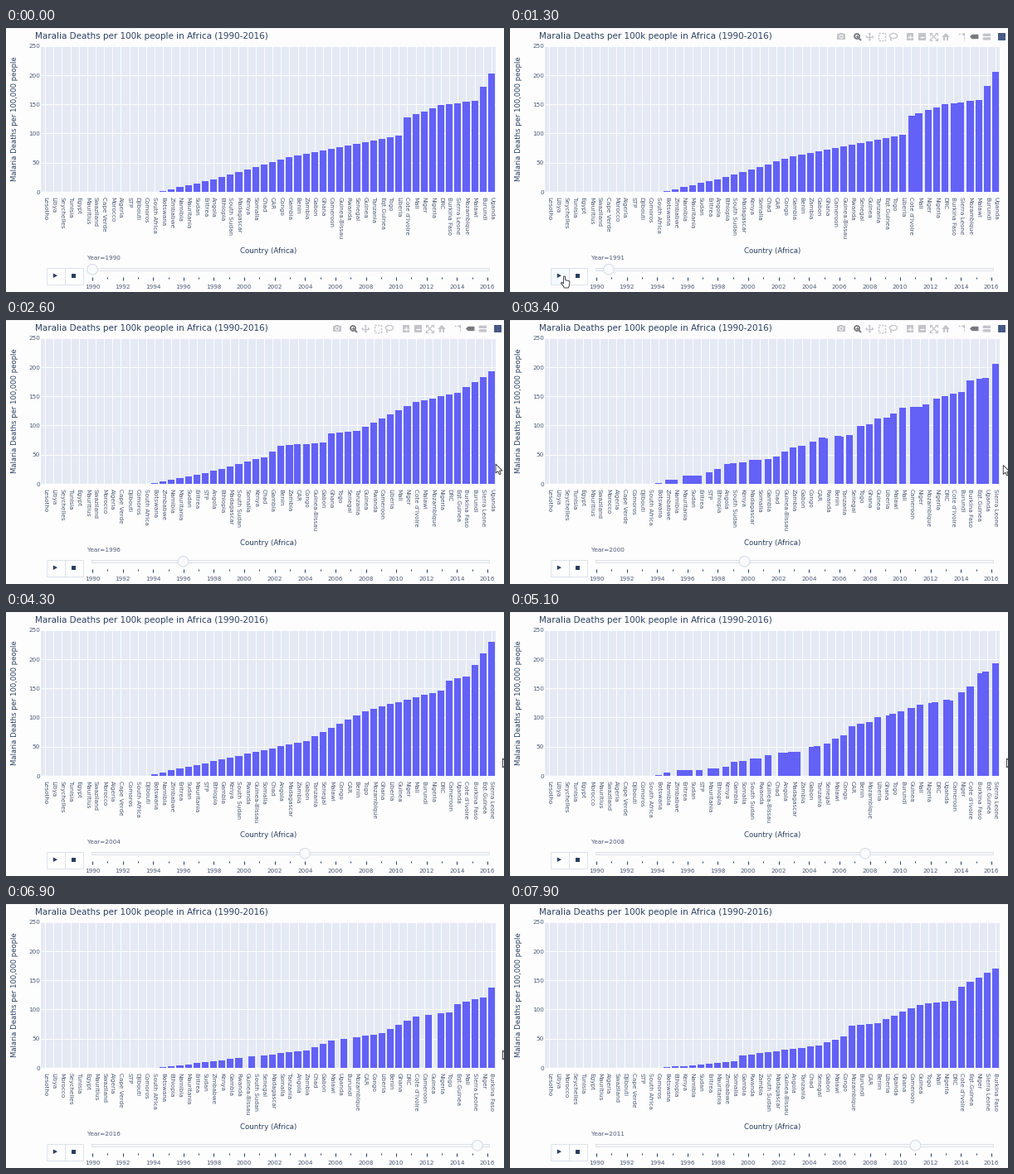
Animation, 600 px wide and 319 px high, one loop 8000 ms. Source, as a matplotlib script:

```python
import numpy as np
import matplotlib.pyplot as plt
from matplotlib.animation import FuncAnimation
from matplotlib.patches import Circle, Polygon, Rectangle

W, H, DPI = 600, 319, 100
STEP, FRAMES = 100, 80
PX = 72 / DPI
LEFT, RIGHT, TOP, BASE = 42, 590, 21.5, 198
INK, SOFT, EDGE, PALE = "#2a3f5f", "#4c5a74", "#d5dbe5", "#f8fafc"
BAR, PLOT, PAGE = "#6361f6", "#e4e9f4", "#fdfdfe"
GREY, DARK = "#c3c4c8", "#77797e"

ORDER_1990 = """Lesotho,Libya,Seychelles,Tunisia,Egypt,Mauritius,Swaziland,
Cape Verde,Morocco,Algeria,STP,Djibouti,Comoros,South Africa,Botswana,Zimbabwe,
Namibia,Mauritania,Sudan,Eritrea,Angola,Ethiopia,South Sudan,Madagascar,Kenya,
Somalia,Chad,CAR,Congo,Gambia,Benin,Zambia,Gabon,Ghana,Cameroon,Guinea-Bissau,
Rwanda,Senegal,Guinea,Tanzania,Eqt.Guinea,Togo,Liberia,Cote d'Ivoire,Mali,Niger,
Nigeria,DRC,Burkina Faso,Sierra Leone,Mozambique,Malawi,Burundi,Uganda"""
ORDER_1996 = """Lesotho,Libya,Seychelles,Tunisia,Egypt,Mauritius,Swaziland,
Morocco,Algeria,Cape Verde,Djibouti,Comoros,South Africa,Botswana,Zimbabwe,
Namibia,Mauritania,Sudan,Eritrea,STP,Angola,Ethiopia,Madagascar,South Sudan,
Somalia,Kenya,Chad,Gambia,Benin,Zambia,CAR,Congo,Guinea-Bissau,Gabon,Ghana,Togo,
Senegal,Tanzania,Guinea,Rwanda,Cameroon,Liberia,Mali,Niger,Cote d'Ivoire,Malawi,
Mozambique,Nigeria,DRC,Eqt.Guinea,Burkina Faso,Burundi,Sierra Leone,Uganda"""
ORDER_2004 = """Lesotho,Libya,Seychelles,Tunisia,Egypt,Mauritius,Swaziland,
Morocco,Algeria,Cape Verde,Comoros,South Africa,Djibouti,Botswana,Namibia,
Zimbabwe,Eritrea,Sudan,Mauritania,STP,Ethiopia,Gambia,Kenya,South Sudan,Rwanda,
Guinea-Bissau,Somalia,Chad,Angola,Madagascar,Zambia,Gabon,Tanzania,Senegal,
Malawi,Congo,CAR,Benin,Togo,Mozambique,Ghana,Liberia,Guinea,Niger,Mali,Burundi,
Nigeria,DRC,Cameroon,Uganda,Cote d'Ivoire,Burkina Faso,Eqt.Guinea,Sierra Leone"""
ORDER_2011 = """Lesotho,Libya,Morocco,Seychelles,Tunisia,Egypt,Mauritius,Algeria,
Swaziland,Djibouti,Cape Verde,STP,South Africa,Comoros,Botswana,Ethiopia,Kenya,
Namibia,Sudan,Eritrea,Mauritania,Zimbabwe,Somalia,Gambia,Rwanda,Zambia,
South Sudan,Madagascar,Guinea-Bissau,Angola,Tanzania,Chad,Senegal,Gabon,Malawi,
Congo,Mozambique,Burundi,CAR,Benin,Liberia,Uganda,Ghana,Cameroon,Guinea,Togo,
Mali,Nigeria,DRC,Cote d'Ivoire,Eqt.Guinea,Niger,Sierra Leone,Burkina Faso"""
ORDER_2015 = """Lesotho,Libya,Morocco,Seychelles,Tunisia,Egypt,Mauritius,
Swaziland,Algeria,Cape Verde,STP,Djibouti,Comoros,South Africa,Botswana,Ethiopia,
Namibia,Mauritania,Eritrea,Sudan,Zimbabwe,Kenya,Gambia,Rwanda,Guinea-Bissau,
South Sudan,Senegal,Madagascar,Somalia,Tanzania,Angola,Zambia,Chad,Gabon,Malawi,
Uganda,Burundi,Mozambique,CAR,Congo,Liberia,Benin,Ghana,DRC,Cote d'Ivoire,
Cameroon,Guinea,Nigeria,Togo,Eqt.Guinea,Mali,Sierra Leone,Niger,Burkina Faso"""

# Bends (rank, rate) of the sorted profile; straight in between.
BENDS_1990 = [(14, 1), (21, 25), (29, 60), (42, 96), (43, 128), (47, 148), (51, 156), (53, 203)]
BENDS_1996 = [(13, 1), (21, 25), (26, 46), (28, 65), (33, 71), (34, 86), (37, 90), (44, 140),
              (49, 156), (53, 192)]
BENDS_2004 = [(13, 3), (20, 25), (31, 60), (38, 111), (47, 146), (48, 163), (50, 170), (53, 229)]
BENDS_2011 = [(14, 1), (22, 11), (23, 21), (32, 38), (35, 54), (36, 72), (39, 77), (44, 108),
              (48, 115), (49, 139), (53, 170)]
BENDS_2015 = [(14, 1), (22, 15), (31, 30), (34, 46), (40, 59), (44, 88), (48, 95), (49, 109),
              (52, 121), (53, 137)]


def names(text):
    return text.replace("\n", "").split(",")


def swapped(order, *ranks):
    order = list(order)
    for r in ranks:
        order[r], order[r + 1] = order[r + 1], order[r]
    return order


COUNTRIES = names(ORDER_1990)
N = len(COUNTRIES)
SLOT = (RIGHT - LEFT) / N


def by_country(order, bends):
    """Rates in the fixed country order; near zero below the first bend."""
    rank = np.arange(N)
    rates = np.interp(rank, *zip(*bends), left=0) + rank * 1e-3
    return rates[[order.index(c) for c in COUNTRIES]]


last = names(ORDER_2015)
KEYS = {
    1990: by_country(COUNTRIES, BENDS_1990),
    1991: by_country(swapped(COUNTRIES, 43, 48), BENDS_1990) * 1.012,
    1996: by_country(names(ORDER_1996), BENDS_1996),
    2004: by_country(names(ORDER_2004), BENDS_2004),
    2011: by_country(names(ORDER_2011), BENDS_2011),
    2015: by_country(last, BENDS_2015),
    2016: by_country(swapped(last, 24, 35, 45), BENDS_2015),
}
YEARS = range(1990, 2017)
stack = np.array(list(KEYS.values()))
VALUES = {y: np.array([np.interp(y, list(KEYS), col) for col in stack.T]) for y in YEARS}
RANKS = {y: np.argsort(np.argsort(VALUES[y])) for y in YEARS}

# Playback as (time, years passed), then a drag back to 2011.
PLAY = [(1180, 0), (1300, .7), (2600, 5.9), (4300, 13.9), (5800, 20.9), (6900, 25.5), (7010, 26)]
DRAG_START, DRAG_TIME = 7450, 250
# Pointer path as (time, x, y).
PATH = [(600, 606, 183), (700, 560, 190), (1100, 65, 300), (1550, 65, 300), (2400, 590, 174),
        (3300, 590, 174), (3500, 598.5, 177), (6900, 598.5, 177), (7200, 580, 285),
        (7400, 580, 290), (7650, 488.5, 290), (7800, 488.5, 330)]


def ease(u):
    u = min(max(u, 0), 1)
    return 4 * u ** 3 if u < .5 else 1 - 4 * (1 - u) ** 3


def state(t):
    """Old year, new year and phase of the step that runs at time t."""
    if t >= DRAG_START:
        return 2016, 2011, min((t - DRAG_START) / DRAG_TIME, 1)
    p = np.interp(t, *zip(*PLAY))
    if p == 0:
        return 1990, 1990, 1
    n = min(int(p), 25)
    return 1990 + n, 1991 + n, p - n


def slide_x(year):
    return 104 + (year - 1990) * 476 / 26


plt.rcParams["font.family"] = "DejaVu Sans"
fig = plt.figure(figsize=(W / DPI, H / DPI), dpi=DPI, facecolor=PAGE)
ax = fig.add_axes([0, 0, 1, 1])
ax.set_xlim(0, W)
ax.set_ylim(H, 0)
ax.axis("off")


def rect(x, y, w, h, fill, edge="none", lw=.8, z=1):
    return ax.add_patch(Rectangle((x, y), w, h, fc=fill, ec=edge, lw=lw * PX, zorder=z))


def poly(points, fill, edge="none", lw=.8, z=1):
    return ax.add_patch(Polygon(points, closed=True, fc=fill, ec=edge, lw=lw * PX, zorder=z))


def line(xs, ys, color, lw, z=1):
    return ax.plot(xs, ys, color=color, lw=lw * PX, zorder=z, solid_capstyle="butt")[0]


def ring(x, y, r, fill, edge, lw, z=1):
    return ax.add_patch(Circle((x, y), r, fc=fill, ec=edge, lw=lw * PX, zorder=z))


def text(x, y, s, px=7.3, color=SOFT, **kw):
    return ax.text(x, y, s, fontsize=px * PX, color=color, **kw)


def draw_chart():
    rect(0, 0, W, 1.2, "#f1f1f3")
    rect(LEFT, TOP, RIGHT - LEFT, BASE - TOP, PLOT)
    for i in range(N):
        x = LEFT + (i + .5) * SLOT
        line([x, x], [TOP, BASE], "white", .9)
    for v in range(0, 251, 50):
        y = BASE - v * (BASE - TOP) / 250
        line([LEFT, RIGHT], [y, y], "white", 1.3 if v == 0 else .9)
        text(41, y + 2.7, str(v), ha="right")
    text(35, 12.9, "Maralia Deaths per 100k people in Africa (1990-2016)", 10.4, INK)
    text(11, 109.5, "Malaria Deaths per 100,000 people", 8.5, INK,
         rotation=90, ha="center", va="center")
    text(316, 271.6, "Country (Africa)", 8.6, INK, ha="center")


def draw_controls():
    button = rect(49, 289.5, 21.5, 20.5, "white", EDGE)
    rect(71, 289.5, 21.5, 20.5, "white", EDGE)
    poly([(56.8, 296.4), (56.8, 302), (62, 299.2)], INK, z=2)
    rect(79.2, 296.7, 4.8, 4.8, INK, z=2)
    rect(103, 290.2, 479, 3, PALE, EDGE)
    for year in YEARS:
        x = slide_x(year)
        even = year % 2 == 0
        line([x, x], [301, 304.5 if even else 303.3], INK, 1)
        if even:
            text(x, 315.3, str(year), ha="center")
    return button


def draw_modebar():
    y = 10.5
    parts = [rect(394, 6.8, 10, 7.4, GREY), rect(397, 5.6, 4, 2, GREY),
             ring(399, y, 2, GREY, "white", .9, 2)]
    parts += [ring(418, 10, 3, "none", DARK, 1.8), line([420, 423], [12, 15], DARK, 2),
              line([416.4, 419.6], [10, 10], DARK, 1), line([418, 418], [8.4, 11.6], DARK, 1)]
    parts += [line([429, 437.4], [y, y], GREY, 1.3), line([433.2] * 2, [6.3, 14.7], GREY, 1.3)]
    for dx, dy in ((1, 0), (-1, 0), (0, 1), (0, -1)):
        tip = np.array([433.2 + 5 * dx, y + 5 * dy])
        back, side = np.array([dx, dy]) * 2, np.array([dy, dx]) * 1.9
        parts.append(poly([tip, tip - back + side, tip - back - side], GREY))
    box = rect(443.6, 6.2, 8.6, 8.6, "none", GREY, 1.4)
    box.set_linestyle((0, (1.6, 1.1)))
    a = np.linspace(0, 2 * np.pi, 30)
    parts += [box, line(462 + 4.6 * np.cos(a), 9.5 + 3 * np.sin(a), GREY, 1.3),
              line([459, 458.6, 460], [12, 14, 15.4], GREY, 1.3)]
    for x in (482, 496.3):
        parts += [rect(x - 4.4, 6.1, 8.8, 8.8, GREY),
                  line([x - 2.6, x + 2.6], [y, y], "white", 1.3, 2)]
    parts.append(line([482, 482], [7.9, 13.1], "white", 1.3, 2))
    for sx in (-1, 1):
        for sy in (-1, 1):
            cx, cy = 510.6 + 4.6 * sx, y + 4.6 * sy
            parts += [line([510.6, cx], [y, cy], GREY, 1.2),
                      line([cx - 3 * sx, cx, cx], [cy, cy, cy - 3 * sy], GREY, 1.1)]
    parts += [poly([(520, 11), (525, 6), (530, 11)], GREY),
              rect(521.6, 10.4, 2.2, 4.2, GREY), rect(526.2, 10.4, 2.2, 4.2, GREY)]
    spike = line([539.5, 547, 547], [7.4, 7.4, 15], GREY, 1.2)
    spike.set_linestyle((0, (2, 1)))
    parts += [spike, rect(545.8, 6.2, 2.4, 2.4, GREY)]
    for x, cy, w, r, color in ((554, y, 10.4, 2.7, DARK), (569, 8.3, 10, 1.7, GREY),
                               (569, 12.9, 10, 1.7, GREY)):
        parts.append(poly([(x, cy), (x + r, cy - r), (x + w, cy - r),
                           (x + w, cy + r), (x + r, cy + r)], color))
    parts.append(rect(588, 6, 9.4, 9.4, "#4a5a86"))
    return parts


ARROW = np.array([(0, 0), (0, 11), (2.6, 8.7), (4.4, 12.6), (6.2, 11.8), (4.5, 8), (8, 8)])
HAND = np.array([(0, 0), (1.3, 0), (1.7, 4.6), (6, 5.6), (7, 7), (6.4, 11), (5.4, 14),
                 (0.4, 14), (-1, 11.4), (-3.6, 8.4), (-2.6, 7.3), (-.6, 8.8), (-.6, .8)])

draw_chart()
play = draw_controls()
modebar = draw_modebar()
bars = [rect(0, BASE, SLOT * .8, 0, BAR, z=3) for _ in COUNTRIES]
ticks = [text(LEFT + (i + .5) * SLOT, 203.5, "", rotation=270, ha="center", va="top")
         for i in range(N)]
year_text = text(98, 280, "")
thumb = ring(104, 291.8, 6.3, PALE, EDGE, 1, 4)
pointer = poly(ARROW, "white", "#333333", .9, 9)


def draw_pointer(t, on):
    times, xs, ys = zip(*PATH)
    x, y = np.interp(t, times, xs), np.interp(t, times, ys)
    on_play = 49 < x < 71 and 289 < y < 311
    hand = on_play or (t >= 7200 and y < 299)
    pointer.set_xy((HAND if hand else ARROW) + (x, y))
    pointer.set_visible(on)
    play.set_facecolor("#f4faff" if on and on_play else "white")


def update(k):
    t = k * STEP
    old, new, phase = state(t)
    u = ease(phase)
    xs = RANKS[old] * (1 - u) + RANKS[new] * u
    hs = (VALUES[old] * (1 - u) + VALUES[new] * u) * (BASE - TOP) / 250
    for bar, x, h in zip(bars, xs, hs):
        bar.set_bounds(LEFT + (x + .1) * SLOT, BASE - h, SLOT * .8, h)
        bar.set_visible(h > .25)
    shown = new if phase >= .8 else old
    for country, rank in zip(COUNTRIES, RANKS[shown]):
        ticks[rank].set_text(country)
    s = 1 if phase == 1 else ease(phase - .06)
    thumb.center = (slide_x(old) * (1 - s) + slide_x(new) * s, 291.8)
    year_text.set_text(f"Year={new}")
    draw_pointer(t, 700 <= t < 7800)
    hover = 700 <= t < 3500 or 7000 <= t < 7800
    for part in modebar:
        part.set_visible(hover)
    return []


anim = FuncAnimation(fig, update, frames=FRAMES, interval=STEP, repeat=True,
                     repeat_delay=0, init_func=lambda: [], blit=False)
plt.show()
```
